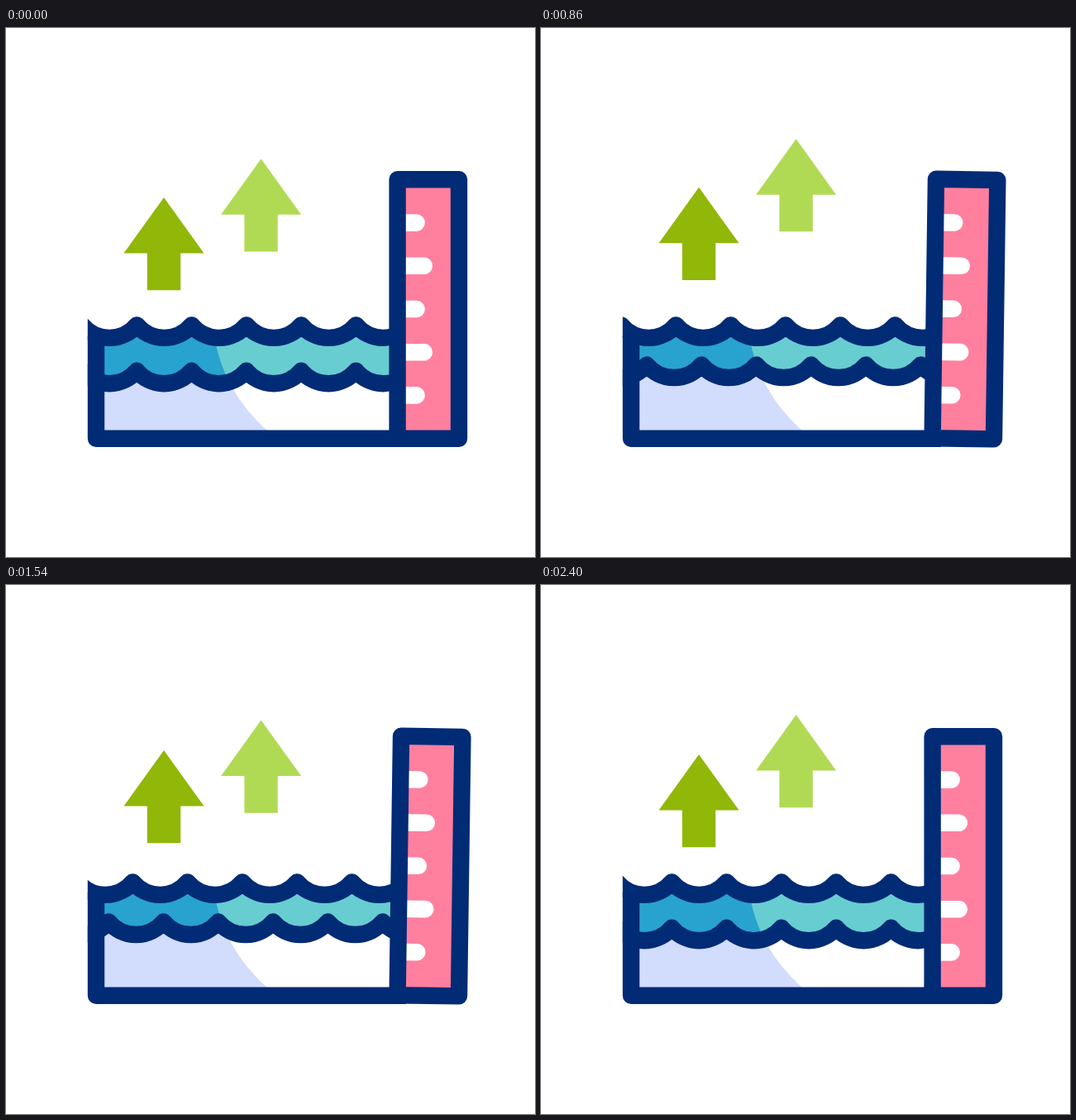
These frames come from a looping animation (640 px wide and 640 px high, 2.42 s). An HTML page:

```html
<!DOCTYPE html>
<html lang="en">
<head>
<meta charset="utf-8">
<title>Rising water level</title>
<style>
  html, body { margin: 0; width: 100%; height: 100%; overflow: hidden; background: #fff; }
  svg { display: block; width: 100vw; height: 100vh; }
  .line { fill: none; stroke: #022b75; stroke-width: 20.4; stroke-linejoin: round; }
</style>
</head>
<body>
<svg viewBox="0 0 640 640">
  <defs>
    <clipPath id="tank"><rect x="98.8" y="330" width="376" height="160"/></clipPath>
    <clipPath id="inside"><rect x="109" y="330" width="366" height="160"/></clipPath>
    <clipPath id="shade"><path d="M90 330H247Q249 350 252 372C258 410 275 450 316 487V492H90Z"/></clipPath>
  </defs>

  <path id="dark" fill="#91b708" d="M0 0L48.5 67.5H20.2V112.2H-20.2V67.5H-48.5Z"/>
  <path id="light" fill="#b1da54" d="M0 0L48.5 67.5H20.2V112.2H-20.2V67.5H-48.5Z"/>

  <g clip-path="url(#inside)">
    <path class="top" fill="#67cdd1"/>
    <g clip-path="url(#shade)"><path class="top" fill="#28a2ce"/></g>
    <path class="low" fill="#fff"/>
    <g clip-path="url(#shade)"><path class="low" fill="#d2dcfd"/></g>
  </g>
  <g clip-path="url(#tank)">
    <path id="topLine" class="line"/>
    <path id="lowLine" class="line"/>
  </g>
  <path class="line" d="M109 372V496.8H484"/>

  <g id="ruler">
    <rect x="473.6" y="183.3" width="74.4" height="313.5" fill="#ff7f9f"/>
    <g id="ticks" stroke="#fff" stroke-width="20.6" stroke-linecap="round"/>
    <rect class="line" x="473.6" y="183.3" width="74.4" height="313.5"/>
  </g>
</svg>
<script>
const LOOP = 2420, CYCLE = 2400, BEAT = 600, WAVE = 66.3;
const $ = id => document.getElementById(id);
const ease = p => p * p * (3 - 2 * p);

// Eased movement through values spaced one beat apart.
function beats(t, keys) {
  const u = Math.min(Math.max(t / BEAT, 0), keys.length - 1);
  const i = Math.min(Math.floor(u), keys.length - 2);
  return keys[i] + (keys[i + 1] - keys[i]) * ease(u - i);
}

// Straight movement through [time, value] points.
function track(t, pts) {
  for (let i = 1; i < pts.length; i++) {
    const [t0, a] = pts[i - 1], [t1, b] = pts[i];
    if (t <= t1) return a + (b - a) * (t - t0) / (t1 - t0);
  }
  return pts[pts.length - 1][1];
}

const ARROW = [0, -38, 26, -25.5, 0];
const TILT = [0, 2, -1, 2, 0];
const LIFT = [0, -12, 0, -12, 0];
const DRIFT = [[0, 0], [360, -19.5], [860, -30.3], [1200, -46], [1260, -44.2],
               [1540, -34], [1860, -22], [2400, 0]];

function wave(shift, y) {
  const off = ((158.2 + shift) % WAVE + WAVE) % WAVE;
  let x = off - WAVE, d = `M${x.toFixed(2)} ${y.toFixed(2)}`;
  while (x < 520) {
    x += WAVE;
    d += `A43.2 43.2 0 0 0 ${x.toFixed(2)} ${y.toFixed(2)}`;
  }
  return d;
}

function setWave(name, d) {
  $(name + 'Line').setAttribute('d', d);
  document.querySelectorAll('.' + name).forEach(p => p.setAttribute('d', d + 'V495H-70Z'));
}

function place(id, x, y) {
  $(id).setAttribute('transform', `translate(${x} ${y.toFixed(2)})`);
}

function draw(t) {
  place('dark', 191, 205 + beats(t, ARROW));
  place('light', 308.6, 158.2 + beats(t - 80, ARROW));
  setWave('top', wave(t / CYCLE * 3 * WAVE, 359.4));
  setWave('low', wave(track(t, DRIFT), 414.7 + beats(t, LIFT)));
  $('ruler').setAttribute('transform', `rotate(${beats(t, TILT).toFixed(3)} 510.8 496.8)`);
}

for (let i = 0; i < 5; i++) {
  const line = document.createElementNS('http://www.w3.org/2000/svg', 'path');
  line.setAttribute('d', `M476 ${235.6 + i * 52.2}H${i % 2 ? 505.8 : 496.6}`);
  $('ticks').append(line);
}

const start = performance.now();
function frame() {
  draw((performance.now() - start) % LOOP);
  requestAnimationFrame(frame);
}
draw(0);
requestAnimationFrame(frame);
</script>
</body>
</html>
```
